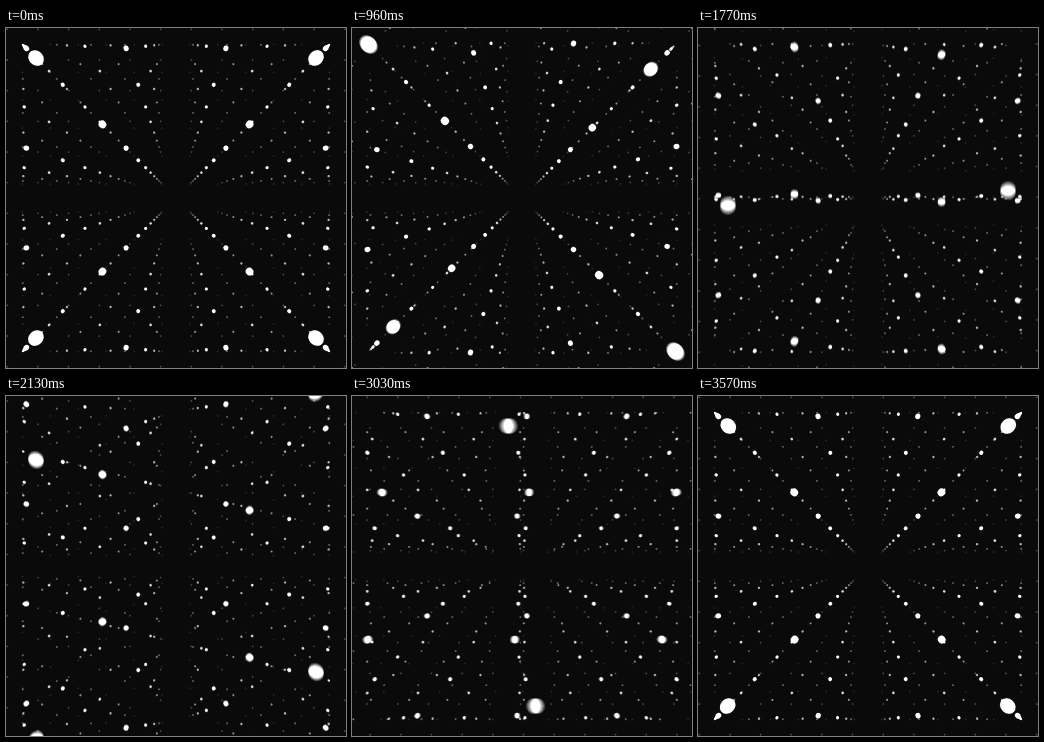
Recreate the animation shown at these times as an HTML page with a canvas. Size 340 by 340 pixels, loop 3.6 s.

```html
<!DOCTYPE html>
<html lang="en">
<head>
<meta charset="utf-8">
<title>Sliding lattice</title>
<style>
  html, body { margin: 0; width: 100%; height: 100%; overflow: hidden; background: #0a0a0a; }
  canvas { display: block; }
</style>
</head>
<body>
<canvas id="stage" width="340" height="340"></canvas>
<script>
const ctx = document.getElementById('stage').getContext('2d');
const SIZE = 340, MID = SIZE / 2;
const FRAME_MS = 30, FRAMES = 120, PHASE_FRAMES = FRAMES / 3;
const SAMPLES = 5, SHUTTER = 0.6;
const FOCAL = 310, NEAR = 1.107, FAR = 12.1, FADE = 7.5, DOT = 7.9;

const ease = p => p * p * (3 - 2 * p);
const sign = n => (n % 2 === 0 ? 1 : -1);

function drawDot(x, y, z) {
  const px = x * FOCAL / z, py = y * FOCAL / z;
  if (Math.abs(px) > MID + 15 || Math.abs(py) > MID + 15) return;
  const r = DOT / z;
  // Perspective stretches a sphere away from the view axis.
  const stretch = Math.hypot(1, px / FOCAL, py / FOCAL);
  ctx.globalAlpha = Math.min(1, (FAR - z) / FADE) / SAMPLES;
  ctx.beginPath();
  ctx.ellipse(MID + px, MID + py, r * stretch, r, Math.atan2(py, px), 0, 2 * Math.PI);
  ctx.fill();
}

// Neighbouring lines of the lattice slide one cell in opposite directions.
function drawLattice(phase, shift) {
  for (let k = -1; k <= 12; k++) {
    for (let i = -9; i <= 8; i++) {
      for (let j = -9; j <= 8; j++) {
        let x = i + 0.5, y = j + 0.5, z = k + NEAR;
        if (phase === 0) z += shift * sign(i + j);
        else if (phase === 1) y += shift * sign(i + k);
        else x += shift * sign(j + k);
        if (z > 0.25 && z < FAR) drawDot(x, y, z);
      }
    }
  }
}

function render(frame) {
  ctx.globalCompositeOperation = 'source-over';
  ctx.globalAlpha = 1;
  ctx.fillStyle = '#0a0a0a';
  ctx.fillRect(0, 0, SIZE, SIZE);
  ctx.globalCompositeOperation = 'lighter';
  ctx.fillStyle = '#fff';
  for (let s = 0; s < SAMPLES; s++) {
    const t = frame + SHUTTER * (s + 0.5) / SAMPLES;
    const phase = Math.floor(t / PHASE_FRAMES);
    drawLattice(phase, ease(t / PHASE_FRAMES - phase));
  }
}

let shown = -1;
function tick(now) {
  const frame = Math.floor(now / FRAME_MS) % FRAMES;
  if (frame !== shown) render(shown = frame);
  requestAnimationFrame(tick);
}
render(0);
requestAnimationFrame(tick);
</script>
</body>
</html>
```
